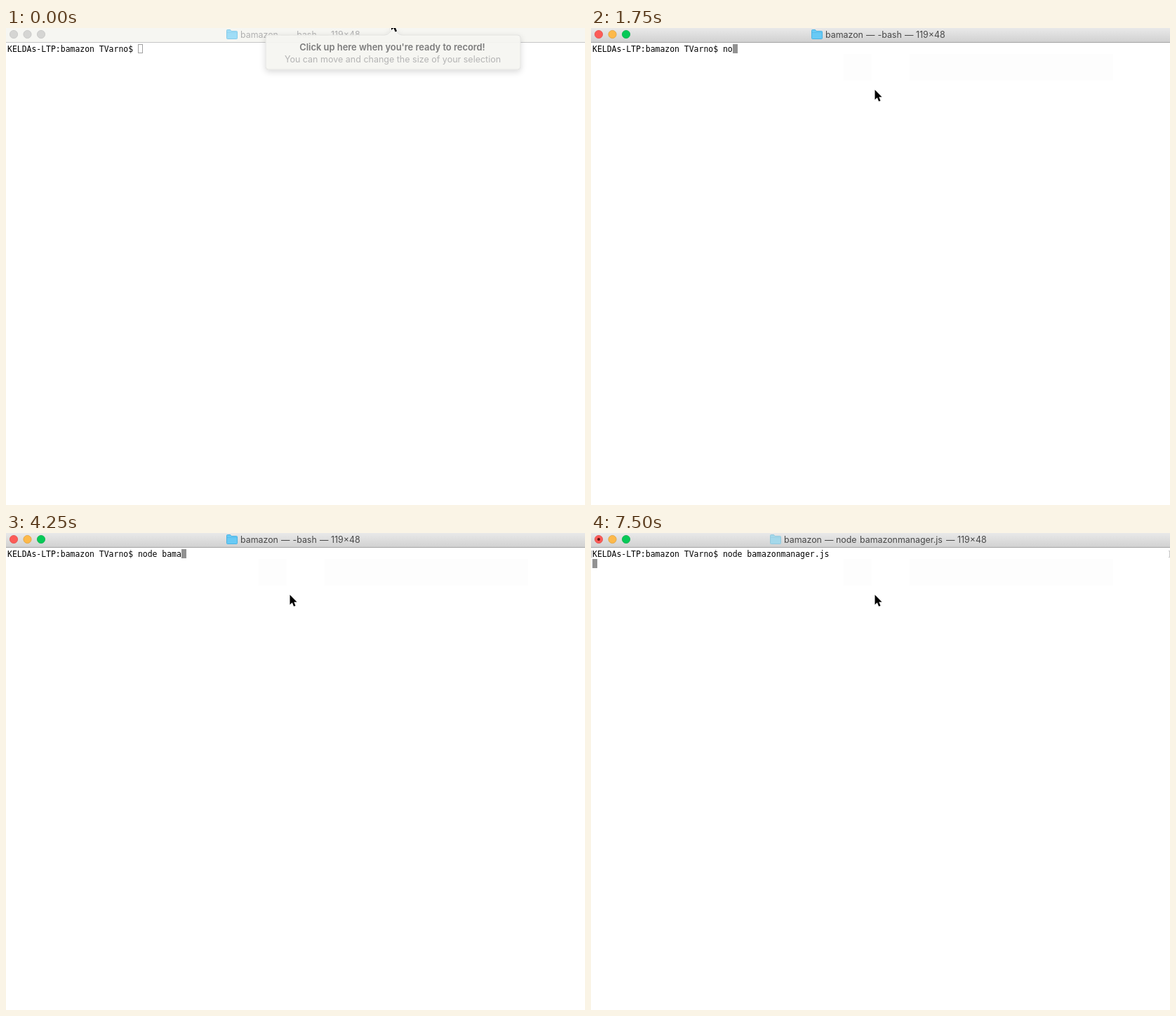
Write an HTML page that moves like this. It is 825 by 679 pixels and loops after 8 s.

```html
<!DOCTYPE html>
<html lang="en">
<head>
<meta charset="utf-8">
<title>Terminal session</title>
<style>
  html, body { margin: 0; width: 100%; height: 100%; overflow: hidden; background: #fff; }
  svg { display: block; width: 825px; height: 679px; }
  text { white-space: pre; }
  .ui { font-family: Inter, "Open Sans", sans-serif; }
  .mono { font: 11.45px "DejaVu Sans Mono", monospace; }
  .title { font-size: 12.4px; }
</style>
</head>
<body>
<svg viewBox="0 0 825 679">
  <defs>
    <linearGradient id="barFill" x2="0" y2="1">
      <stop offset="0" stop-color="#e9e9e9"/>
      <stop offset="1" stop-color="#d1d1d1"/>
    </linearGradient>
    <filter id="shadow" x="-10%" y="-30%" width="120%" height="180%">
      <feDropShadow dx="0" dy="3" stdDeviation="4" flood-color="#000" flood-opacity=".16"/>
    </filter>
  </defs>
  <rect width="825" height="679" fill="#fff"/>
  <g id="ghost" fill="#fdfdfd"></g>

  <rect id="bar" width="825" height="20"/>
  <rect id="barLine" y="20" width="825" height="1"/>
  <g id="lights"></g>
  <circle id="busyDot" cx="11" cy="9" r="2" fill="#5c0f0d"/>
  <g id="folder">
    <path d="M.5 3.5Q.5 2.5 1.5 2.5H5.5L7 4.5H14.5Q15.5 4.5 15.5 5.5V14.5Q15.5 15.5 14.5 15.5H1.5Q.5 15.5 .5 14.5Z"/>
    <path d="M1 6.5H15" stroke-opacity=".5"/>
  </g>
  <text id="title" class="ui title" y="14"></text>

  <text id="line" class="mono" x="2" y="34"></text>
  <rect id="caret" width="7" height="13"/>
  <path id="marks" d="M2 25.5H.5V34.5H2M823 25.5H824.5V34.5H823" fill="none" stroke="#c4c4c4"/>

  <g id="tip" class="ui" text-anchor="middle">
    <path d="M374 10H540Q544 10 547 6L552 0L557 6Q560 10 564 10H729Q733 10 733 14V55Q733 59 729 59H374Q370 59 370 55V14Q370 10 374 10Z"
      fill="#f7f7f3" fill-opacity=".93" stroke="#dededb" stroke-width=".8" filter="url(#shadow)"/>
    <text x="550.5" y="31.5" font-size="12.9" font-weight="600" fill="#7c7c7c">Click up here when you're ready to record!</text>
    <text x="551" y="48.5" font-size="12.5" fill="#b4b4b4">You can move and change the size of your selection</text>
  </g>
  <path id="mouse" d="M0 0V14L3.3 11L5.6 16.4L8 15.4L5.8 10.2H10Z" fill="#000" stroke="#fff" stroke-width="1.2" paint-order="stroke"/>
</svg>
<script>
const LOOP = 8000;
const CELL = 6.893;
const PROMPT = "KELDAs-LTP:bamazon TVarno$ ";
const COMMAND = "node bamazonmanager.js";

// [time, characters typed]
const KEYS = [
  [1750, 2], [2000, 3], [2250, 4], [2500, 5], [3500, 7], [3750, 8], [4250, 9], [4500, 11],
  [4750, 12], [5000, 14], [5250, 16], [5500, 19], [6000, 20], [6250, 21], [6500, 22]
];
// [time, x, y]
const MOUSE = [[0, 549, -11], [250, 440, 37], [500, 404.5, 88]];
// [time, rectangles as x, y, width, height]
const GHOSTS = [
  [0, []],
  [250, [[359, 21, 385, 54]]],
  [500, [[359, 21, 385, 16], [359, 37, 44, 38], [451, 37, 293, 38]]],
  [750, [[360, 37, 40, 38], [454, 37, 290, 38]]]
];
const IDLE = { x: 314, words: [["bamazon", 334], ["—", 392], ["-bash", 408.5], ["—", 447], ["119×48", 463]] };
const BUSY = { x: 255, words: [["bamazon", 275], ["—", 333], ["node", 349], ["bamazonmanager.js", 383], ["—", 506], ["119×48", 522]] };
const LIGHTS = ["#fc5b57", "#fdb94a", "#06c957"];
const RIMS = ["#e2504c", "#e0a13c", "#0cb04c"];

const $ = id => document.getElementById(id);
const set = (node, attrs) => {
  for (const key in attrs) node.setAttribute(key, attrs[key]);
  return node;
};
const add = (parent, tag, attrs) =>
  parent.appendChild(set(document.createElementNS("http://www.w3.org/2000/svg", tag), attrs));
const show = (node, on) => set(node, { visibility: on ? "visible" : "hidden" });
const latest = (list, t) => list.filter(item => item[0] <= t).pop();

const lights = LIGHTS.map((_, i) => add($("lights"), "circle", { cx: 11 + 19.5 * i, cy: 9, r: 5.6 }));

function drawBar(active, busy) {
  set($("bar"), { fill: active ? "url(#barFill)" : "#f6f6f2" });
  set($("barLine"), { fill: active ? "#a4a4a4" : "#c6c6c6" });
  lights.forEach((light, i) => set(light, {
    fill: active ? LIGHTS[i] : "#d5d5d3",
    stroke: active ? RIMS[i] : "#c5c5c3",
    "stroke-width": .8
  }));
  show($("busyDot"), busy);

  const { x, words } = busy ? BUSY : IDLE;
  set($("folder"), {
    transform: `translate(${x} 0)`,
    fill: busy ? "#a4d8ea" : active ? "#68caf5" : "#9fddf7",
    stroke: busy ? "#93c9dd" : active ? "#4bb2e2" : "#87cbe9"
  });
  const title = $("title");
  title.replaceChildren();
  set(title, { fill: active ? "#484848" : "#b0b0b0" });
  for (const [word, left] of words) add(title, "tspan", { x: left }).textContent = word;
}

function drawTerminal(t, active, busy) {
  const typed = (latest(KEYS, t) || [0, 0])[1];
  $("line").textContent = PROMPT + COMMAND.slice(0, typed);
  const x = busy ? 2 : Math.round(2 + (PROMPT.length + typed) * CELL);
  const y = busy ? 37 : 23;
  set($("caret"), active
    ? { x, y, width: 7, height: 13, fill: "#929292", stroke: "none" }
    : { x: x + .5, y: y + .5, width: 6, height: 12, fill: "none", stroke: "#a0a0a0" });
  show($("marks"), busy);
}

function drawOverlay(t) {
  show($("tip"), t < 250);
  const [, x, y] = latest(MOUSE, t);
  set($("mouse"), { transform: `translate(${x} ${y})` });
  $("ghost").replaceChildren();
  for (const [gx, gy, width, height] of latest(GHOSTS, t)[1])
    add($("ghost"), "rect", { x: gx, y: gy, width, height });
}

function render(t) {
  const active = t >= 750;
  const busy = t >= 7000;
  drawBar(active, busy);
  drawTerminal(t, active, busy);
  drawOverlay(t);
}

const start = performance.now();
function tick() {
  render((performance.now() - start) % LOOP);
  requestAnimationFrame(tick);
}
tick();
</script>
</body>
</html>
```
